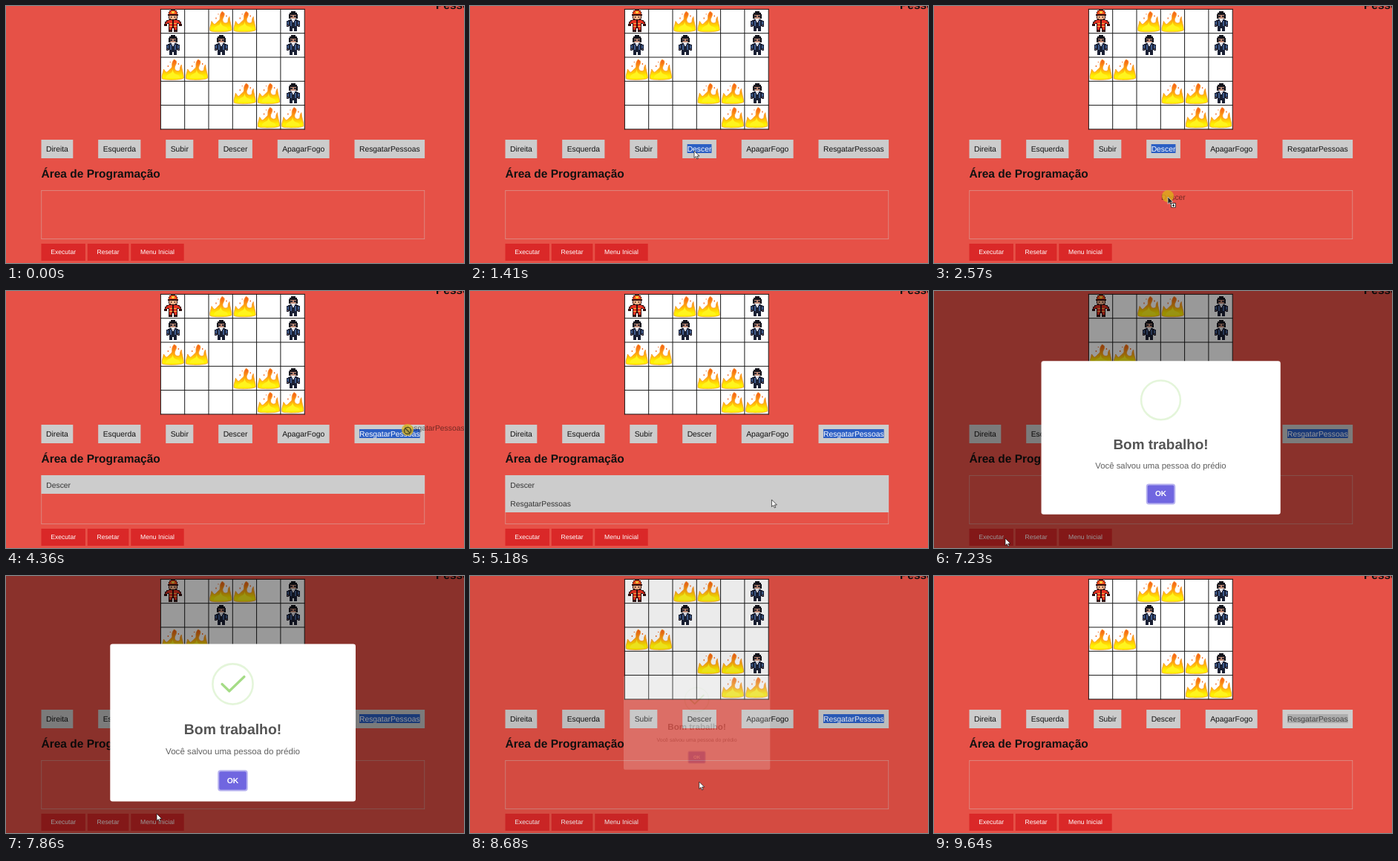
Animation of 617 by 346 pixels, one loop 9.71 s. Source, as an HTML page:

```html
<!DOCTYPE html>
<html lang="pt">
<head>
<meta charset="utf-8">
<style>
  html, body { margin: 0; width: 100%; height: 100%; overflow: hidden; background: #e65147; }
  svg { display: block; width: 617px; height: 346px; font: 10.35px "Liberation Sans", Arial, sans-serif; text-rendering: geometricPrecision; }
</style>
</head>
<body>
<svg id="stage" viewBox="0 0 617 346"></svg>
<script>
const LOOP = 9710, CELL = 32.3, LEFT = 208.4, TOP = 4.4, ROWS = 5, COLS = 6;
const AT = { appear: 250, run: 6100, step: 6250, open: 7160, ok: 8450, close: 8560, leave: 9440, blur: 9640 };
const drags = [
  { name: 'Descer', pick: 1280, grab: 1630, drop: 2770, dx: 9, dy: 3.7 },
  { name: 'ResgatarPessoas', pick: 3700, grab: 4080, drop: 4950, dx: 5, dy: 0 }
];
// The pointer rests between moves; bend bows the way sideways.
const moves = [
  { from: 250, to: 880, x: 302, y: 195 },
  { from: 1630, to: 2500, x: 315, y: 257, bend: 1.1 },
  { from: 2770, to: 3700, x: 481, y: 196, bend: -.1 },
  { from: 4080, to: 4360, x: 541, y: 188 },
  { from: 4360, to: 4950, x: 412, y: 280 },
  { from: 5110, to: 6010, x: 96, y: 333 },
  { from: 7300, to: 7860, x: 203, y: 320 },
  { from: 7860, to: 8300, x: 305, y: 276 },
  { from: 8620, to: 9440, x: 540, y: 346 }
];

const $ = id => document.getElementById(id);
const show = (id, on) => $(id).setAttribute('visibility', on ? 'visible' : 'hidden');
const within = (t, a, b) => t >= a && t < b;
const clamp = p => Math.max(0, Math.min(1, p));
const progress = (t, from, to) => clamp((t - from) / (to - from));
const smooth = p => p * p * (3 - 2 * p);
const range = n => [...Array(n).keys()];

const rect = (x, y, w, h, fill, extra = '') => `<rect x="${x}" y="${y}" width="${w}" height="${h}" fill="${fill}" ${extra}/>`;
const text = (x, y, str, fill = '#111', extra = '') => `<text x="${x}" y="${y}" fill="${fill}" ${extra}>${str}</text>`;
const place = (id, [row, col], extra = '') =>
  `<use href="#${id}" x="${LEFT + col * CELL}" y="${TOP + row * CELL}" ${extra}/>`;

// Figures are symmetric: each part is given as its right half.
const figure = (id, parts) => `<g id="${id}">` + Object.entries(parts).map(([d, fill]) =>
  [1, -1].map(side => `<path d="${d}" fill="${fill}" transform="translate(16.6 -.4) scale(${side} 1)" shape-rendering="crispEdges"/>`).join('')).join('') + '</g>';

const defs = `<defs>
  <linearGradient id="heat" x2="0" y2="1"><stop stop-color="#f4581c"/><stop offset=".5" stop-color="#ffae0c"/><stop offset=".8" stop-color="#fff000"/></linearGradient>
  <g id="fire"><path d="M2 29C1 24 3 22 4 16L7 20C9 21 11 17 14 15C17 12 13 9 18 3C24 5 20 10 19 13C18 17 22 20 25 18C27 17 25 14 28 10C28 16 31 22 31 28C28 31 5 31 2 29z" fill="url(#heat)" stroke="#fb9a2a" stroke-width=".8"/>
    <path d="M7 28q0-4 5-6q4-1 4-6q1 6 5 7q5 1 5 5z" fill="#fff41e"/><path d="M10 11v2M24 8v2M13 6v1" stroke="#f4702a" stroke-width="1.4"/></g>
  ${figure('fireman', {
    'M0 1h3v1h2v2h1v3h1v2h-1v4h-1v1h-5z': '#301010',
    'M0 2h3v1h2v3h1v1h-6z': '#ee4a1c',
    'M0 3h2v3h-2z': '#ffc83c',
    'M0 9h5v4h-2v1h-3z': '#f4b48c',
    'M2 10h1v2h-1z': '#301010',
    'M0 14h6v1h3v2h2v3h1v3h-4v-3h-2v6h-6z': '#301010',
    'M1 15h5v1h2v2h2v2h-2v-1h-3v6h-4z': '#e63020',
    'M1 19h4v1h-4zM1 23h4v1h-4z': '#ffb84a',
    'M0 25h6v6h-5v-5h-1z': '#301010',
    'M2 25h3v3h-3z': '#e63020'
  })}
  ${figure('person', {
    'M0 3h3v2h2v2h1v6h-6z': '#14141c',
    'M0 8h4v4h-1v1h-3z': '#c08c78',
    'M1 9h3v2h-3z': '#2c2830',
    'M0 14h5v1h2v1h2v8h-3v-1h-1v3h-5z': '#1a2034',
    'M2 16h2v7h-2zM6 17h2v4h-2z': '#405c8c',
    'M0 14h2v2h-1v2h-1z': '#dcdce4',
    'M7 22h1v1h-1z': '#c08c78',
    'M0 25h5v5h-4v-4h-1z': '#1a2034'
  })}
</defs>`;

const gridLines = range(COLS + 1).map(i => `M${LEFT + i * CELL} ${TOP}v${ROWS * CELL}`).join('') +
  range(ROWS + 1).map(i => `M${LEFT} ${TOP + i * CELL}h${COLS * CELL}`).join('');
const board = rect(LEFT, TOP, COLS * CELL, ROWS * CELL, '#fff') + `<path d="${gridLines}" stroke="#181818" stroke-linecap="square"/>` +
  [[0, 2], [0, 3], [2, 0], [2, 1], [3, 3], [3, 4], [4, 4], [4, 5]].map(c => place('fire', c)).join('') +
  [[0, 5], [1, 2], [1, 5], [3, 5]].map(c => place('person', c)).join('') +
  place('person', [1, 0], 'id="rescued"') + place('fireman', [0, 0], 'id="hero"');

// Lays out labelled boxes from left to right; without a gap they spread over the full width.
const pen = document.createElement('canvas').getContext('2d');
function layout(names, size, pad, gap) {
  pen.font = `${size * 10}px "Liberation Sans", Arial, sans-serif`;
  const items = names.map(name => ({ name, w: pen.measureText(name).width / 10 + 2 * pad }));
  gap ??= (516.6 - items.reduce((sum, item) => sum + item.w, 0)) / (items.length - 1);
  let x = 47.5;
  for (const item of items) { item.x = x; x += item.w + gap; }
  return items;
}
const commands = layout(['Direita', 'Esquerda', 'Subir', 'Descer', 'ApagarFogo', 'ResgatarPessoas'], 10.35, 6.45);
const actions = layout(['Executar', 'Resetar', 'Menu Inicial'], 8.62, 12.7, 2.9);

const commandBar = commands.map(c => rect(c.x, 180, c.w, 25, '#ccc') + text(c.x + 6.45, 195.7, c.name)).join('');
const actionBar = actions.map(a => rect(a.x, 320, a.w, 23, '#da2828') + text(a.x + 12.7, 334.2, a.name, '#fff', 'font-size="8.62"')).join('');
const dragParts = drags.map(({ name }, i) => {
  const { x, w } = commands.find(c => c.name === name), y = 248 + 25 * i;
  return `<g id="pick${i}">${rect(x + 6.45, 186, w - 12.9, 12, '#2c5fc4')}${text(x + 6.45, 195.7, name, '#fff')}</g>
    <g id="row${i}">${rect(47.5, y, 516.6, 25, '#ccc')}${text(54.3, y + 16.5, name, '#333')}</g>`;
}).join('');

const mid = 'text-anchor="middle"', bold = 'font-weight="bold"';
const modal = `<g id="modal">${rect(140.3, 91.5, 330.7, 212, '#fff', 'rx="3.3"')}
  <g fill="none" stroke="#a5dc86" stroke-width="2.6">
    <circle cx="305.5" cy="145.5" r="27.1" stroke-opacity=".3"/>
    <circle id="sweep" cx="305.5" cy="145.5" r="27.1" pathLength="360"/>
    <path id="check" d="M291 145.5L300.8 155L321 135.5" pathLength="1" stroke-width="3.2" stroke-linecap="round" stroke-linejoin="round"/>
  </g>
  ${text(305.5, 213, 'Bom trabalho!', '#545454', `${mid} ${bold} font-size="19.4"`)}
  ${text(305.5, 240, 'Você salvou uma pessoa do prédio', '#606060', `${mid} font-size="11.64"`)}
  ${rect(286.2, 262.2, 38.6, 26.6, '#7066e0', 'rx="3" stroke="#b7b2ef" stroke-width="2"')}
  ${text(305.5, 278.5, 'OK', '#fff', `${mid} ${bold}`)}</g>`;

const arrow = (fill, line) => `<path d="M0 0V9.5L2.3 7.5L3.9 11L5.4 10.3L3.9 7H7Z" fill="${fill}" stroke="${line}" stroke-width=".7"/>`;
const pointer = `<g id="pointer">
  <circle id="press" cy="-1" r="8" fill="#deb418" fill-opacity=".75"/>
  <g id="arrow">${arrow('#fff', '#111')}</g>
  <g id="copy">${arrow('#222', '#ddd')}${rect(4.5, 8.5, 6, 5.5, '#fff', 'stroke="#222" stroke-width=".8"')}<path d="M7.5 9.7V13M5.8 11.3H9.2" stroke="#111"/></g>
  <g id="deny" fill="none" stroke="#4a4a20" stroke-width="1.3"><circle r="4.5"/><path d="M-3.2-3.2L3.2 3.2"/></g>
  <path id="hand" d="M0 0q1-1 1.8 0V4l4 1q1 .5 .8 2L6 11H1L-2 7q0-2 2-.5z" fill="#fff" stroke="#111" stroke-width=".8"/>
</g>`;

$('stage').innerHTML = defs + rect(0, 0, 617, 346, '#e65147') +
  text(579, 4, 'Pessoas', '#111', `${bold} font-size="15.5"`) + board + commandBar +
  text(47.5, 231, 'Área de Programação', '#111', `${bold} font-size="15.5"`) +
  rect(47.8, 248.3, 516, 65.4, 'none', 'stroke="#d9a09a" stroke-width=".65"') + dragParts + actionBar +
  rect(0, 0, 617, 346, '#000', 'id="shade"') + modal +
  text(0, 0, '', '#000', 'id="ghost" fill-opacity=".5"') + pointer;

function pointerAt(t) {
  let x = 521, y = 314;
  for (const m of moves) {
    if (t < m.from) break;
    const p = smooth(progress(t, m.from, m.to));
    const dx = m.x - x, dy = m.y - y, bow = 2 * p * (1 - p) * (m.bend || 0);
    x += dx * p + dy * bow;
    y += dy * p - dx * bow;
  }
  return [x, y];
}

function drawModal(t) {
  const age = t - AT.open - 5, out = progress(t, AT.close, AT.close + 150);
  const open = t >= AT.open && out < 1;
  show('modal', open);
  $('shade').setAttribute('opacity', open ? .4 * clamp((age + 20) / 70) * (1 - out) : 0);
  const spring = 1 - .3 * Math.exp(-age / 80) * Math.cos(age / 48);
  $('modal').setAttribute('transform', `translate(305.6 197.5) scale(${open ? spring * (1 - out / 2) : 1}) translate(-305.6 -197.5)`);
  $('modal').setAttribute('opacity', 1 - out);

  // An arc runs back around the ring, then the tick is drawn.
  const turn = 360 * smooth(progress(age, 210, 510));
  const head = Math.min(turn, 180), tail = Math.max(0, turn - 180);
  $('sweep').setAttribute('stroke-dasharray', `${head - tail} 360`);
  $('sweep').setAttribute('transform', `rotate(${45 - head} 305.5 145.5)`);
  $('check').setAttribute('stroke-dasharray', `${smooth(progress(age, 405, 690))} 2`);
  show('check', open && age > 405);
  show('sweep', open && head > tail);
}

function drawPointer(t) {
  const [x, y] = pointerAt(t);
  const drag = drags.find(d => within(t, d.grab, d.drop)), inArea = y > 248 && y < 314;
  const here = within(t, AT.appear, AT.leave);
  const hand = within(t, AT.run - 300, AT.open) || within(t, AT.ok - 200, AT.close);
  const clicks = [AT.run, AT.ok, ...drags.flatMap(d => [d.pick - 150, d.pick])];
  $('pointer').setAttribute('transform', `translate(${x} ${y})`);
  show('press', drag || clicks.some(c => within(t, c, c + 90)));
  show('copy', drag && inArea);
  show('deny', drag && !inArea);
  show('hand', here && hand);
  show('arrow', here && !hand && !drag);

  const ghost = $('ghost');
  ghost.textContent = drag ? drag.name : '';
  ghost.setAttribute('x', x - (drag ? drag.dx : 0));
  ghost.setAttribute('y', y + (drag ? drag.dy : 0));
}

function draw(t) {
  const stepped = within(t, AT.step, AT.open);
  $('hero').setAttribute('y', TOP + (stepped ? CELL : 0));
  $('hero').setAttribute('opacity', stepped ? .8 : 1);
  show('rescued', t < AT.open);
  drags.forEach((d, i) => {
    show('row' + i, within(t, d.drop, AT.open));
    show('pick' + i, within(t, d.pick, drags[i + 1]?.pick ?? LOOP));
  });
  const blurred = t >= AT.blur, [mark, label] = $('pick1').children;
  mark.setAttribute('fill', blurred ? '#adadad' : '#2c5fc4');
  label.setAttribute('fill', blurred ? '#444' : '#fff');
  drawModal(t);
  drawPointer(t);
}

function tick() {
  draw(performance.now() % LOOP);
  requestAnimationFrame(tick);
}
tick();
</script>
</body>
</html>
```
